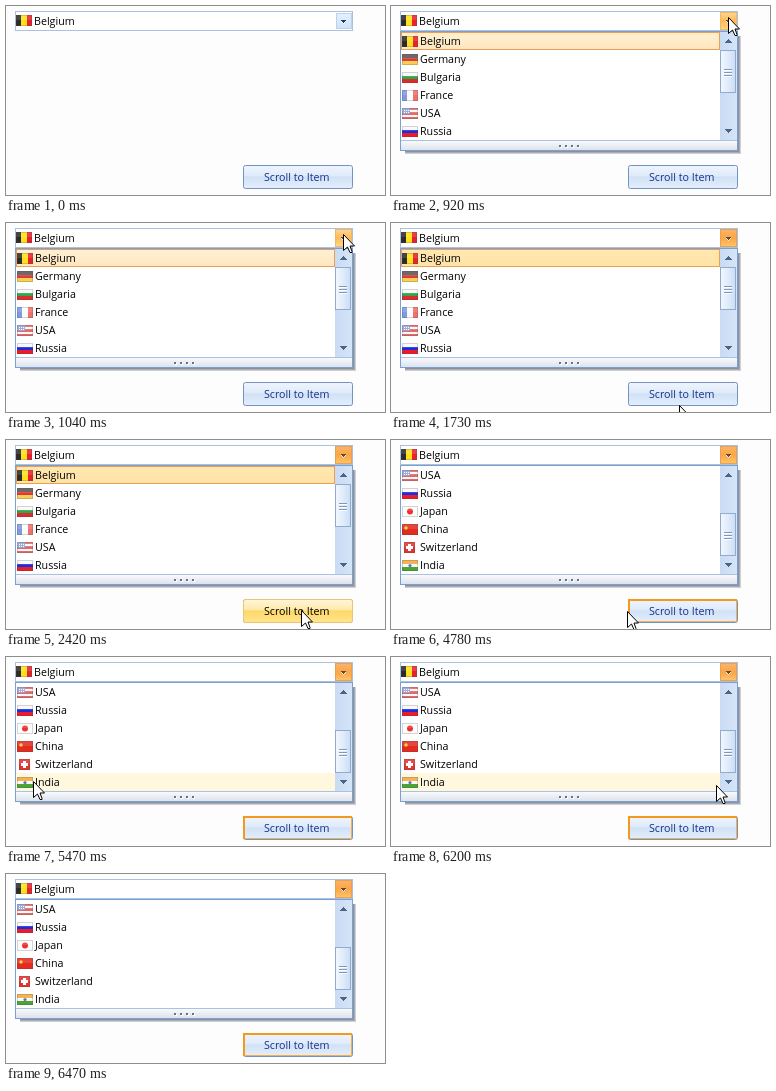
An HTML page with a canvas that plays this animation: 379x189 px, repeating every 7.35 s.

```html
<!DOCTYPE html>
<html lang="en">
<head>
<meta charset="utf-8">
<title>Scroll to Item</title>
<style>
  html, body { margin: 0; width: 100%; height: 100%; overflow: hidden; background: #fdfdfd; }
  canvas { display: block; }
</style>
</head>
<body>
<canvas id="stage" width="379" height="189"></canvas>
<script>
const ctx = document.getElementById('stage').getContext('2d');
const LOOP = 7350;

// Each country: name, stripe direction, stripe colours, optional emblem
const countries = [
  ['Belgium', 'v', ['#2b2b2b', '#ffe01c', '#e8222a']],
  ['Germany', 'h', ['#555', '#e23a30', '#f5cf58']],
  ['Bulgaria', 'h', ['#f8f8f8', '#2fa64a', '#dc2c2c']],
  ['France', 'v', ['#7f9be0', '#fbfbfb', '#f0706a']],
  ['USA', 'h', ['#e26a6a', '#fafafa', '#e26a6a', '#fafafa', '#e26a6a'], usaCanton],
  ['Russia', 'h', ['#f8f8f8', '#1c2ce0', '#ea1c28']],
  ['Japan', 'h', ['#fcfcfc'], (x, y) => disc(x + 8, y + 5.5, 3, '#ee3030')],
  ['China', 'h', ['#e32b20'], (x, y) => disc(x + 4, y + 4, 1.7, '#f8d02c')],
  ['Switzerland', 'square', ['#e5322d'], swissCross],
  ['India', 'h', ['#f4aa3c', '#fafafa', '#4aa534'], (x, y) => disc(x + 8, y + 5.5, 1.6, '#5a70b8')],
];

// Pointer stops: [start time, x, y]; no position means hidden
const pointerStops = [
  [0], [650, 360, 20], [770, 337, 11], [1340, 361, 100], [1460],
  [1730, 288, 182], [1880, 294, 174], [2420, 295, 170], [4780, 236, 171],
  [4930, 120, 146], [5050, 19, 126], [5200, 8, 119], [5350, 24, 123],
  [5470, 27, 124], [5620, 29, 124], [5930, 128, 123], [6050, 287, 124],
  [6200, 325, 128], [6350, 356, 133], [6470],
];

function rect(x, y, w, h, fill) {
  ctx.fillStyle = fill;
  ctx.fillRect(x, y, w, h);
}

function outline(x, y, w, h, color) {
  ctx.strokeStyle = color;
  ctx.lineWidth = 1;
  ctx.strokeRect(x + .5, y + .5, w - 1, h - 1);
}

function disc(x, y, r, fill) {
  ctx.fillStyle = fill;
  ctx.beginPath();
  ctx.arc(x, y, r, 0, 7);
  ctx.fill();
}

function shade(x0, y0, x1, y1, ...colors) {
  const g = ctx.createLinearGradient(x0, y0, x1, y1);
  colors.forEach((c, i) => g.addColorStop(i / (colors.length - 1), c));
  return g;
}

function text(label, x, y, color = '#000') {
  ctx.font = '10.7px "Open Sans", "Noto Sans", sans-serif';
  ctx.fillStyle = color;
  ctx.fillText(label, x, y);
}

function arrow(x, y, dir, color, half = 3) {
  for (let i = 0; i < half; i++) {
    rect(x - half + 1 + i, y + dir * i, 2 * (half - i) - 1, 1, color);
  }
}

function usaCanton(x, y) {
  rect(x, y, 8, 6, '#93a2d2');
  for (let i = 0; i < 6; i++) rect(x + 2 + i % 3 * 2, y + 2 + (i > 2) * 2, 1, 1, '#fff');
}

function swissCross(x, y) {
  rect(x + 6, y + 2, 3, 7, '#fff');
  rect(x + 4, y + 4, 7, 3, '#fff');
}

function flag([, layout, colors, emblem], x, y) {
  const square = layout === 'square';
  const left = square ? x + 2 : x, w = square ? 11 : 16, h = 11;
  const n = colors.length;
  colors.forEach((c, i) => {
    const a = Math.round(i / n * (layout === 'v' ? w : h));
    if (layout === 'v') rect(left + a, y, w - a, h, c);
    else rect(left, y + a, w, h - a, c);
  });
  if (emblem) emblem(x, y);
  rect(left, y, w, 5, 'rgba(255,255,255,.12)');
  outline(left, y, w, h, 'rgba(70,70,70,.22)');
}

function comboBox(t) {
  rect(9, 5, 338, 20, '#fff');
  outline(9, 5, 338, 20, '#abc1de');
  flag(countries[0], 10, 9);
  text('Belgium', 28, 19);
  if (t < 770) {
    rect(330, 7, 16, 16, shade(0, 7, 0, 23, '#e6f1fd', '#cfe2f8'));
    outline(330, 7, 16, 16, '#b9d2f0');
  } else {
    const colors = t < 1190 ? ['#ffd797', '#ffb956', '#ffd98a'] : ['#fbb567', '#fda544', '#fec66c'];
    rect(329, 6, 17, 18, shade(0, 6, 0, 24, ...colors));
    outline(329, 6, 17, 18, t < 1190 ? '#efb76a' : '#e5a05a');
  }
  arrow(337, 15, 1, 'rgba(255,255,255,.7)');
  arrow(337, 14, 1, t < 770 ? '#173a78' : '#5a4a44');
}

function scrollBar(scrolled) {
  rect(329, 26, 17, 108, shade(329, 0, 346, 0, '#c9dbf3', '#d5e5f8'));
  arrow(337, 36, -1, '#4c6488', 4);
  arrow(337, 123, 1, '#4c6488', 4);
  const y = scrolled ? 73 : 44;
  rect(329, y, 16, 43, shade(329, 0, 345, 0, '#f4f8fd', '#e0ecfa', '#cadcf3'));
  outline(329, y, 16, 43, '#8fabd0');
  for (let i = 0; i < 3; i++) {
    rect(333, y + 19 + i * 3, 8, 1, '#7f97bb');
    rect(333, y + 20 + i * 3, 8, 1, '#fff');
  }
}

function popup(t) {
  for (let i = 3; i > 0; i--) rect(14, 30, 333 + i, 115 + i, 'rgba(50,60,80,.24)');
  rect(9, 25, 338, 120, '#fff');
  const scrolled = t >= 3760;
  const first = scrolled ? 4 : 0;
  if (!scrolled) {
    const colors = t < 1190 ? ['#fff0d4', '#ffe6bd'] : ['#ffe7b0', '#ffe3a6'];
    rect(10, 26, 319, 18, shade(0, 26, 0, 44, ...colors));
    outline(10, 26, 319, 18, '#eb9f55');
  }
  if (t >= 5350 && t < 6350) rect(10, 116, 319, 18, '#fff8df');
  countries.slice(first, first + 6).forEach((country, i) => {
    const y = 26 + i * 18;
    flag(country, 11, y + 4);
    text(country[0], 29, y + 13);
  });
  scrollBar(scrolled);
  rect(10, 134, 336, 10, shade(0, 134, 0, 144, '#fbfcfe', '#dde3ec'));
  rect(10, 134, 336, 1, '#a9c2e2');
  for (let x = 168; x < 190; x += 6) {
    rect(x + 1, 140, 2, 2, '#fff');
    rect(x, 139, 2, 2, '#65738a');
  }
  outline(9, 25, 338, 120, '#7b9fd0');
}

function buttonFace(fills, border, labelColor) {
  ctx.beginPath();
  ctx.roundRect(237.5, 159.5, 109, 23, 2);
  const g = ctx.createLinearGradient(0, 160, 0, 183);
  [0, .45, .46, 1].forEach((stop, i) => g.addColorStop(stop, fills[i]));
  ctx.fillStyle = g;
  ctx.fill();
  ctx.strokeStyle = border;
  ctx.lineWidth = 1;
  ctx.stroke();
  text('Scroll to Item', 258, 175, labelColor);
}

function button(t) {
  buttonFace(['#edf4fd', '#dfeafa', '#d0e1f6', '#e5effc'], '#7593c2', '#15308c');
  const fadeSteps = [1880, 2030, 2150, 2270, 2420];
  if (t >= 1880 && t < 4780) {
    ctx.globalAlpha = fadeSteps.filter(s => t >= s).length / fadeSteps.length;
    buttonFace(['#fff6d8', '#ffe9a8', '#ffd767', '#ffe58f'], '#e8c673', '#000');
    ctx.globalAlpha = 1;
  } else if (t >= 4780) {
    outline(238, 160, 108, 22, '#f5b04c');
    rect(237, 159, 109, 2, '#f39a1e');
    rect(237, 159, 2, 23, '#f39a1e');
  }
}

function pointer(t) {
  const [, x, y] = pointerStops.findLast(stop => t >= stop[0]);
  if (x === undefined) return;
  ctx.save();
  ctx.translate(x + .5, y + .5);
  ctx.fillStyle = '#fff';
  ctx.strokeStyle = '#000';
  ctx.lineWidth = 1;
  const path = new Path2D('M0 0V16L4 12.5L6.5 18H8.5V17L6.5 11.5H11Z');
  ctx.fill(path);
  ctx.stroke(path);
  ctx.restore();
}

function draw(now) {
  const t = now % LOOP;
  rect(0, 0, 379, 189, '#fdfdfd');
  comboBox(t);
  if (t >= 920) popup(t);
  button(t);
  pointer(t);
}

const start = performance.now();
function frame() {
  draw(performance.now() - start);
  requestAnimationFrame(frame);
}
frame();
</script>
</body>
</html>
```
